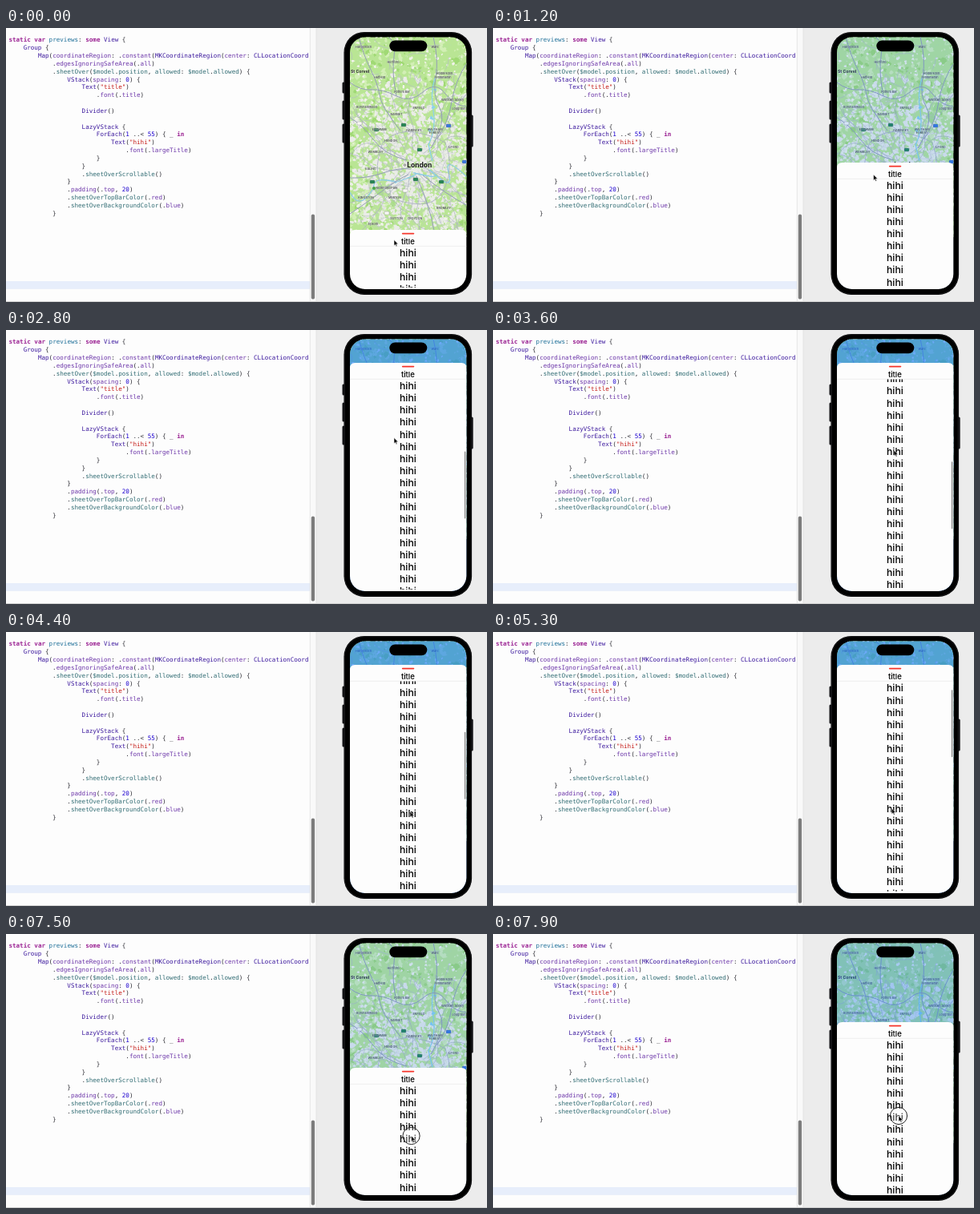
An HTML page that plays this animation: 600 by 342 pixels, repeating every 8 s.

```html
<!DOCTYPE html>
<html lang="en">
<head>
<meta charset="utf-8">
<title>Sheet preview</title>
<style>
  html, body { margin: 0; width: 100%; height: 100%; overflow: hidden; background: #ececec; }
  svg { display: block; width: 100%; height: 100%; }
  text { white-space: pre; }
  #code { font: 7.58px "DejaVu Sans Mono", "Noto Sans Mono", monospace; fill: #2c2c33; }
  .keyword { fill: #9b2393; font-weight: 700; }
  .type { fill: #3d1a9e; }
  .system { fill: #6c36a9; }
  .project { fill: #326d74; }
  .declared { fill: #1d6f98; }
  .string { fill: #c41a16; }
  .number { fill: #1c00cf; }
  #labels { font: 600 3.7px Inter, "Noto Sans", sans-serif; fill: #4a4e50; text-anchor: middle; }
  #sheet, #rows { font: 500 9.6px Inter, "Open Sans", sans-serif; fill: #000; text-anchor: middle; }
  #rows { font-size: 12.2px; }
</style>
</head>
<body>
<svg viewBox="0 0 600 342" preserveAspectRatio="none">
  <defs>
    <clipPath id="editorClip"><rect width="378.6" height="342"/></clipPath>
    <clipPath id="screenClip"><rect x="429" y="11.5" width="145.3" height="314.5" rx="19"/></clipPath>
    <clipPath id="listClip"><rect id="listArea" x="429" width="146"/></clipPath>
  </defs>
  <rect width="600" height="342" fill="#ececec"/>
  <rect width="387" height="342" fill="#fdfdfd"/>
  <rect y="316" width="379" height="9.8" fill="#e7eefb"/>
  <rect x="379" width="8" height="342" fill="#f9f9f9"/>
  <path d="M379.3 0V342M387 0V342" stroke="#dedede" stroke-width=".7"/>
  <rect x="380.8" y="232.5" width="4.3" height="106" rx="2.1" fill="#7c7c7c"/>
  <path d="M0 341.5H600" stroke="#cfcfcf"/>
  <g id="code" clip-path="url(#editorClip)"></g>

  <path d="M421 69V80M421 92V113M421 121V142M581.2 110V147" stroke="#17171a" stroke-width="3" stroke-linecap="round"/>
  <rect x="421.5" y="4.9" width="159.6" height="328" rx="25.5" fill="#000"/>
  <rect x="422.4" y="5.8" width="157.8" height="326.2" rx="24.6" fill="none" stroke="#2c2c30" stroke-width=".6"/>
  <g clip-path="url(#screenClip)">
    <g id="map"></g>
    <g id="labels"></g>
    <rect id="tint" x="428" y="11" width="148" height="316" fill="#0a74ff"/>
    <g id="sheet">
      <path d="M427 340V7L429 6.5Q429 0 435.5 0H568Q574.5 0 574.5 6.5L576 7V340Z" fill="#fdfdfd"/>
      <path d="M494.8 4.6H508.4" stroke="#f5352b" stroke-width="1.8" stroke-linecap="round"/>
      <text x="501.4" y="17.8">title</text>
      <path d="M429 20.3H575" stroke="#dddddf" stroke-width=".5"/>
    </g>
    <g clip-path="url(#listClip)"><g id="rows"></g></g>
    <rect id="thumb" x="571.9" width="1.4" height="84" rx=".7" fill="#8a8a8a"/>
  </g>
  <rect x="478.3" y="15.4" width="47" height="13.8" rx="6.9" fill="#000"/>
  <g id="pointer">
    <circle id="touch" r="10.6" fill="#fff" fill-opacity=".25" stroke="#222" stroke-width="1"/>
    <path d="M0 0V7.2L1.7 5.7L2.8 8.2L4 7.7L2.9 5.2H5.2Z" fill="#000" stroke="#fff" stroke-width=".55"/>
  </g>
</svg>
<script>
const $ = id => document.getElementById(id);
const escapeText = s => s.replace(/&/g, "&amp;").replace(/</g, "&lt;");

// Code editor
const source = `static var previews: some View {
    Group {
        Map(coordinateRegion: .constant(MKCoordinateRegion(center: CLLocationCoord
            .edgesIgnoringSafeArea(.all)
            .sheetOver($model.position, allowed: $model.allowed) {
                VStack(spacing: 0) {
                    Text("title")
                        .font(.title)

                    Divider()

                    LazyVStack {
                        ForEach(1 ..< 55) { _ in
                            Text("hihi")
                                .font(.largeTitle)
                        }
                    }
                    .sheetOverScrollable()
                }
                .padding(.top, 20)
                .sheetOverTopBarColor(.red)
                .sheetOverBackgroundColor(.blue)
            }`;
const rules = [
  ["string", /^"/], ["keyword", /^(static|var|some|in)$/], ["number", /^\d/],
  ["declared", /^previews$/],
  ["project", /^(sheetOver\w*|position|allowed|\$model)$/],
  ["type", /^[A-Z]/],
  ["system", /^(coordinateRegion|constant|center|edgesIgnoringSafeArea|all|spacing|font|title|largeTitle|padding|top|red|blue)$/]
];
function highlight(line) {
  return line.match(/"[^"]*"|\$?\w+|[^\w"$]+/g).map(token => {
    const rule = rules.find(r => r[1].test(token));
    return rule ? `<tspan class="${rule[0]}">${escapeText(token)}</tspan>` : escapeText(token);
  }).join("");
}
$("code").innerHTML = source.split("\n").map((line, i) => {
  const body = line.trimStart();
  const x = 3.4 + (line.length - body.length) * 4.56;
  return body && `<text x="${x}" y="${17.4 + i * 9.83}">${highlight(body)}</text>`;
}).join("");

// Map
let seed = 41;
const random = () => {
  seed = (seed * 1664525 + 1013904223) % 4294967296;
  return seed / 4294967296;
};
const between = (a, b) => a + (b - a) * random();
const place = () => [between(427, 576), between(9, 258)];
const cityDistance = (x, y) => Math.hypot((x - 508) / 78, (y - 180) / 100);

function blob(x, y, r) {
  const points = [];
  for (let i = 0; i < 7; i++) {
    const a = i / 7 * Math.PI * 2, d = r * between(.4, 1.4);
    points.push((x + d * Math.cos(a)).toFixed(1) + " " + (y + d * Math.sin(a)).toFixed(1));
  }
  return "M" + points.join("L") + "Z";
}
function blobs(count, min, max, keep) {
  let d = "";
  for (let i = 0; i < count; i++) {
    const [x, y] = place(), r = between(min, max);
    if (keep(cityDistance(x, y))) d += blob(x, y, r);
  }
  return d;
}
function road(x, y, angle, steps, length) {
  let d = `M${x} ${y}`;
  for (let i = 0; i < steps; i++) {
    angle += between(-.4, .4);
    x += length * Math.cos(angle);
    y += length * Math.sin(angle);
    d += `L${x.toFixed(1)} ${y.toFixed(1)}`;
  }
  return d;
}
const repeat = (n, make) => Array.from({ length: n }, (_, i) => make(i)).join("");
const fill = (d, color) => `<path d="${d}" fill="${color}"/>`;
const line = (d, color, width) =>
  `<path d="${d}" fill="none" stroke="${color}" stroke-width="${width}" stroke-linejoin="round"/>`;
const streets = (count, reach) => repeat(count, () => {
  const [x, y] = place();
  return cityDistance(x, y) < reach ? road(x, y, between(0, 6.3), 4, between(2, 6)) : "";
});

const motorways = "M429 68Q442 78 456 77T487 85T520 80T548 82T576 98M440 11Q446 34 455 52T466 84T492 128" +
  "M487 85Q481 56 484 36T476 11M533 11Q540 40 536 62T541 100T530 150M576 42Q560 66 556 92T538 138" +
  "M429 112Q444 120 458 139T500 165M429 187Q450 188 470 181T505 176M429 232Q450 218 470 203T502 183M535 258Q530 225 512 185M576 222Q548 207 520 184";
const ring = "M470 143Q488 126 510 130T548 143Q559 172 548 198T507 219Q476 216 467 195T470 143Z";
const river = "M429 205Q438 222 448 213T459 196T475 190T486 193T499 188T510 181T523 184T532 180T540 187T552 180T576 187";

$("map").innerHTML =
  `<rect x="428" y="11" width="148" height="250" fill="#b9e594"/>` +
  fill(blobs(500, 1, 4, d => d > .5), "#d2efb5") +
  fill(blobs(260, 1, 4, d => d > .7), "#a0d974") +
  fill(blobs(2600, 1.2, 3.8, d => random() > d * .85 - .14), "#eaece7") +
  fill(blobs(500, .7, 2.4, d => d > .7), "#f1f3ea") +
  fill(blobs(600, .6, 2.3, d => d > .25), "#b8e499") +
  fill(blob(464, 202, 7) + blob(549, 112, 6) + blob(555, 100, 6) + blob(482, 219, 4), "#aade88") +
  line(streets(420, .95), "#c3c6cf", .4) +
  line(streets(90, 2), "#b3b8c6", .6) +
  line(repeat(20, i => {
    const a = i / 20 * Math.PI * 2, r = between(4, 22);
    return road(508 + r * Math.cos(a), 174 + r * Math.sin(a), a, 14, 7);
  }), "#a9afc0", .65) +
  line("M535 62Q529 82 533 104T527 146L532 166", "#8bd1ee", 1.2) +
  fill(blob(533, 99, 3) + blob(531, 112, 3) + blob(529, 128, 2.5) + blob(535, 77, 2), "#8bd1ee") +
  line(river, "#8dcbe6", 1.3) +
  line(ring, "#a9aec0", .8) +
  line(motorways, "#949db6", 1);

const labels = [
  ["Harpenden", 446, 25], ["Ware", 535, 25], ["Hertford", 483, 44], ["Hoddesdon", 547, 58],
  ["Fennimarsh", 545, 63], ["Hatfield", 466, 63], ["Potters Bar", 494, 81], ["Borehamwood", 450, 100],
  ["Waltham Abbey", 557, 91], ["Loughton", 565, 102], ["ENFIELD", 515, 101], ["BARNET", 487, 109],
  ["EDGWARE", 466, 128], ["HARINGEY", 509, 129], ["WALTHAM", 535, 128], ["FOREST", 535, 132],
  ["HENDON", 480, 142], ["WEMBLEY", 461, 156], ["ILFORD", 558, 150], ["EALING", 455, 177],
  ["Richmond Park", 475, 201], ["KINGSTON", 449, 213], ["MERTON", 485, 213], ["BROMLEY", 546, 226],
  ["CROYDON", 510, 239], ["SUTTON", 487, 239], ["Epsom", 458, 246]
];
const shields = [
  ["#278653", [[496, 121], [516, 152], [511, 189], [457, 192], [543, 192], [462, 127]]],
  ["#3a78dc", [[552, 122], [572, 167]]],
  ["#f8f8f4", [[441, 119], [498, 203], [475, 231]]]
];
const label = ([name, x, y], style = "") =>
  `<text x="${x}" y="${y}" style="${style}" stroke="#fff" stroke-opacity=".45" stroke-width=".5" paint-order="stroke">${name}</text>`;
$("labels").innerHTML =
  shields.map(([color, spots]) => spots.map(([x, y]) =>
    `<rect x="${x - 3}" y="${y - 2}" width="6" height="4" rx="1" fill="${color}" stroke="#667" stroke-width=".3"/>`
  ).join("")).join("") +
  labels.map(l => label(l)).join("") +
  `<circle cx="459" cy="200" r="2" fill="#4ba447"/>` +
  label(["St Corvel", 441.5, 55.5], "font-size:5.2px;font-weight:700;fill:#222") +
  `<circle cx="497.5" cy="171" r="1.1" fill="#fff" stroke="#333" stroke-width=".6"/>` +
  label(["London", 515.8, 173.8], "font-size:8.5px;font-weight:700;fill:#181818");

$("rows").innerHTML = repeat(54, i => `<text x="501.4" y="${33 + i * 15.07}">hihi</text>`);

// Motion: [time, value] pairs joined by eased segments
const tracks = {
  top: [[100, 252], [1000, 168], [1400, 168], [1900, 41], [6400, 41], [6950, 167], [7500, 167], [7900, 110]],
  scroll: [[2050, 0], [2800, 271], [3400, 310], [3900, 310], [4400, 190], [5600, 0]],
  x: [[200, 484], [1000, 474], [2200, 482], [2800, 484], [3600, 500], [4400, 504], [5600, 496], [6200, 480],
      [6950, 480], [7400, 505.5], [7900, 506]],
  y: [[100, 264.5], [1000, 183], [1400, 183], [1900, 56], [2200, 190], [2800, 134.5], [3600, 150], [4400, 224],
      [5400, 220], [6200, 50], [6400, 50], [6950, 176], [7400, 252], [7500, 252], [7900, 227]]
};
function valueAt(keys, t) {
  const next = keys.findIndex(k => k[0] > t);
  if (next === 0) return keys[0][1];
  if (next < 0) return keys[keys.length - 1][1];
  const [t0, a] = keys[next - 1], [t1, b] = keys[next];
  const p = (t - t0) / (t1 - t0);
  return a + (b - a) * p * p * (3 - 2 * p);
}
const LOOP = 8000, STEP = 100;
function draw(time) {
  const t = Math.floor(time % LOOP / STEP) * STEP;
  const top = valueAt(tracks.top, t), scroll = valueAt(tracks.scroll, t);
  $("tint").setAttribute("opacity", .58 * ((252 - top) / 211) ** 1.5);
  $("sheet").setAttribute("transform", `translate(0 ${top})`);
  $("rows").setAttribute("transform", `translate(0 ${top - scroll})`);
  $("listArea").setAttribute("y", top + 20.5);
  $("listArea").setAttribute("height", 303.3 - top);
  $("thumb").setAttribute("y", 62.5 + scroll * .328);
  $("thumb").setAttribute("opacity", t >= 2000 && t <= 6400 ? 1 : 0);
  $("touch").setAttribute("opacity", t >= 7400 ? 1 : 0);
  $("pointer").setAttribute("transform", `translate(${valueAt(tracks.x, t)} ${valueAt(tracks.y, t)})`);
}
const start = performance.now();
function tick() {
  draw(performance.now() - start);
  requestAnimationFrame(tick);
}
tick();
</script>
</body>
</html>
```
